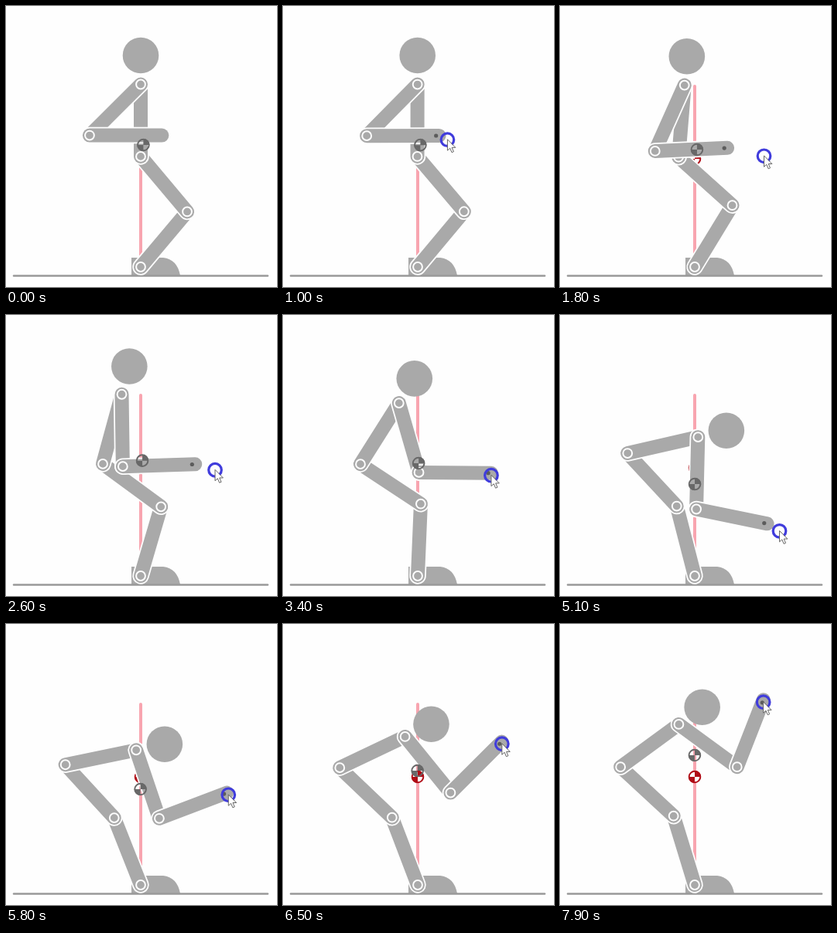
These frames come from a looping animation (350x364 px, 8000 ms). An HTML page with a canvas:

```html
<!DOCTYPE html>
<html>
<head>
<meta charset="utf-8">
<style>
html, body { margin: 0; width: 100%; height: 100%; overflow: hidden; background: #fefefe; }
canvas { display: block; }
</style>
</head>
<body>
<canvas id="stage" width="350" height="364"></canvas>
<script>
const ctx = document.getElementById('stage').getContext('2d');
const GREY = '#a9a9a9', WHITE = '#fefefe', { PI, cos, sin } = Math;
const LOOP = 8000, STEP = 100, LIMB = 93.4;
const ANKLE = [174, 338], GOAL = [174, 198], ENTRY = [291, 134];
const ENTER = 200, GRAB = 800;

// Key poses: time, angles of shin, thigh, torso, upper arm, forearm, balance height
const POSES = [
  [900, -50, -130, -90, 135, 0, 180],
  [1800, -58.7, -138, -85.3, 114, -2.5, 186],
  [3400, -87.6, -146.5, -57.8, 74, 0.5, 192],
  [4400, -94.3, -133.7, -16.3, 102.5, 31.5, 221],
  [5800, -111.5, -132.5, -11.7, 71.4, -20.8, 214],
  [6500, -110.8, -136.3, -25.5, 51, -45, 190],
  [7900, -107, -137.2, -36.3, 36.3, -68.7, 170]
];

const clamp = u => Math.min(1, Math.max(0, u));
const ease = u => u * u * (3 - 2 * u);
const mix = (a, b, u) => a + (b - a) * u;

// Smooth interpolation that never overshoots its keys
function poseAt(t) {
  const last = POSES.length - 1;
  t = Math.min(POSES[last][0], Math.max(POSES[0][0], t));
  const i = Math.min(last, POSES.findIndex(k => k[0] >= t) || 1) - 1;
  const a = POSES[i], b = POSES[i + 1], span = b[0] - a[0], u = (t - a[0]) / span;
  const slope = (n, c) => (POSES[n + 1][c] - POSES[n][c]) / (POSES[n + 1][0] - POSES[n][0]);
  const tangent = (n, c) => {
    if (n === 0 || n === last) return 0;
    const p = slope(n - 1, c), q = slope(n, c);
    return p * q > 0 ? 2 * p * q / (p + q) : 0;
  };
  return a.map((v, c) => mix(v, b[c], ease(u)) +
    span * u * (1 - u) * ((1 - u) * tangent(i, c) - u * tangent(i + 1, c))).slice(1);
}

function along([x, y], degrees, length) {
  const r = degrees * PI / 180;
  return [x + length * cos(r), y + length * sin(r)];
}

// The pointer runs ahead of the hand in two fading pulls
function pointerAt(t, elbow, fore) {
  const fade = Math.max(0, 1 - (t - 2000) / 5000);
  const reach = 48 * fade * cos(PI * (t - 2000) / 2800) ** 2;
  const [x, y] = along(elbow, fore, LIMB + reach);
  const u = ease(clamp((t - ENTER) / 200));
  return [mix(ENTRY[0], x, u), mix(ENTRY[1], y + 3 + reach / 5, u)];
}

function disc([x, y], r, color) {
  ctx.fillStyle = color;
  ctx.beginPath();
  ctx.arc(x, y, r, 0, 2 * PI);
  ctx.fill();
}

function ring([x, y], r, width, color) {
  ctx.strokeStyle = color;
  ctx.lineWidth = width;
  ctx.beginPath();
  ctx.arc(x, y, r, 0, 2 * PI);
  ctx.stroke();
}

function line(a, b, width, color) {
  ctx.strokeStyle = color;
  ctx.lineWidth = width;
  ctx.beginPath();
  ctx.moveTo(...a);
  ctx.lineTo(...b);
  ctx.stroke();
}

function limb(a, b, joints = [a, b]) {
  line(a, b, 21.5, WHITE);
  line(a, b, 18, GREY);
  joints.forEach(p => ring(p, 5.9, 2, WHITE));
}

function marker([x, y], color) {
  ctx.fillStyle = color;
  for (const start of [PI / 2, -PI / 2]) {
    ctx.beginPath();
    ctx.moveTo(x, y);
    ctx.arc(x, y, 8, start, start + PI / 2);
    ctx.fill();
  }
  ring([x, y], 7.3, 2, color);
}

function arrow([x, y]) {
  const path = new Path2D('M0 0V14L3.3 11L5.6 16.5L8 15.5L5.7 10.2H10Z');
  ctx.save();
  ctx.translate(x, y);
  ctx.fillStyle = '#fff';
  ctx.fill(path);
  ctx.strokeStyle = '#666';
  ctx.lineWidth = 1;
  ctx.stroke(path);
  ctx.restore();
}

function draw(t) {
  const [shin, thigh, torso, upper, fore, height] = poseAt(t);
  const knee = along(ANKLE, shin, LIMB);
  const hip = along(knee, thigh, LIMB);
  const shoulder = along(hip, torso, LIMB);
  const head = along(shoulder, torso, 37.5);
  const elbow = along(shoulder, upper, LIMB);
  const hand = along(elbow, fore, LIMB);
  const balance = [mix(ANKLE[0], knee[0], 0.04) + 1, height];

  ctx.fillStyle = WHITE;
  ctx.fillRect(0, 0, 350, 364);
  ctx.lineCap = 'round';
  line([174, 104], ANKLE, 4, '#f8a5b0');
  disc(GOAL, 7, WHITE);
  marker(GOAL, '#b00c16');

  ctx.fillStyle = GREY;
  ctx.fill(new Path2D('M162 349V326H203Q221 328 225 349Z'));
  line([10, 349.5], [338, 349.5], 2.4, '#999');

  limb(ANKLE, knee);
  limb(knee, hip);
  limb(hip, shoulder);
  disc(head, 23.3, GREY);
  limb(shoulder, elbow);
  limb(elbow, hand, [elbow]);
  marker(balance, '#686868');

  if (t >= GRAB) disc(along(elbow, fore, 89.5), 2.6, '#5c5c5c');
  if (t >= ENTER) {
    const tip = pointerAt(t, elbow, fore);
    if (t >= GRAB) ring(tip, 8.3, 3.2, '#403cdc');
    arrow(tip);
  }
}

function tick(now) {
  draw(Math.floor(now % LOOP / STEP) * STEP);
  requestAnimationFrame(tick);
}
requestAnimationFrame(tick);
</script>
</body>
</html>
```
